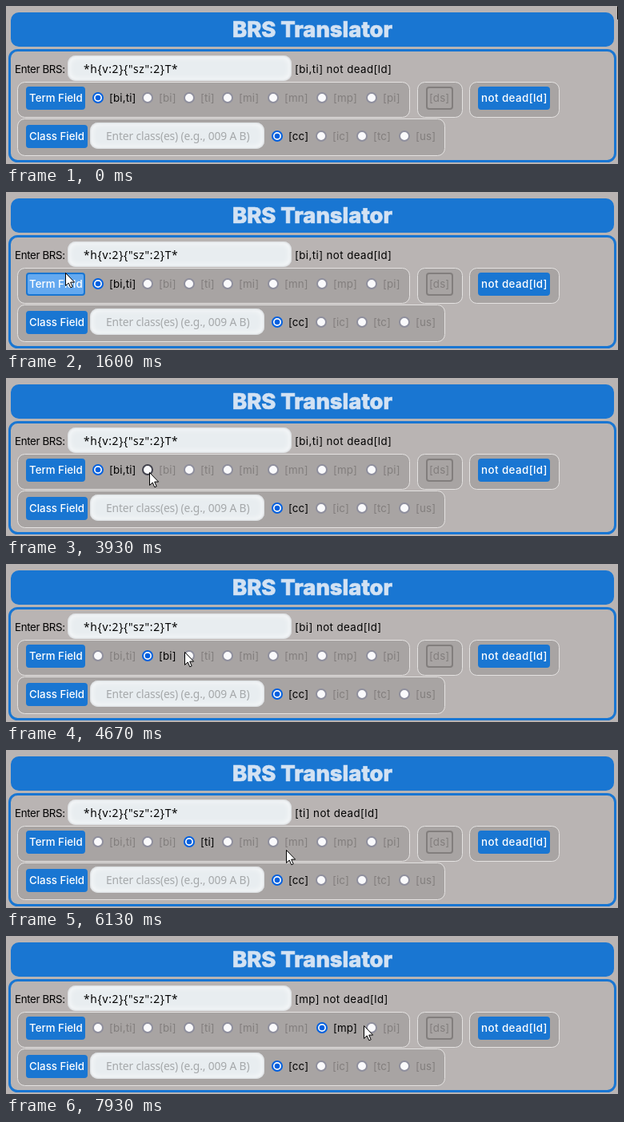
These frames come from a looping animation (765 px wide and 198 px high, 8000 ms). An HTML page:

```html
<!DOCTYPE html>
<html lang="en">
<head>
<meta charset="utf-8">
<title>BRS Translator</title>
<style>
  html, body { margin: 0; width: 100%; height: 100%; overflow: hidden; background: #b9b4b3; }
  svg { display: block; width: 765px; height: 198px; }
  text { font: 13.3px Inter, Roboto, sans-serif; white-space: pre; }
  .title { font-size: 27.4px; font-weight: 800; fill: #d3e2f3; stroke: #d3e2f3; stroke-width: .7; text-anchor: middle; }
  .field { font: 13.8px "Noto Sans", "Open Sans", sans-serif; }
  .button { fill: #fff; font-weight: 500; }
  .label { letter-spacing: .15px; }
  .input {
    height: 100%; border-radius: 10px; background: #e8edf0;
    box-shadow: inset 0 0 3px #b8bcc0, inset 0 0 9px 1px #fff;
  }
</style>
</head>
<body>
<svg id="stage" viewBox="0 0 765 198"></svg>
<script>
const LOOP = 8000, TICKS = 120;
const BLUE = '#1976d2', MUTED = '#827e7d';
const stage = document.getElementById('stage');

function add(tag, attrs, content) {
  const node = document.createElementNS('http://www.w3.org/2000/svg', tag);
  for (const key in attrs) node.setAttribute(key, attrs[key]);
  if (content) node.textContent = content;
  return stage.appendChild(node);
}

const box = (x, y, width, height, rx, attrs) => add('rect', { x, y, width, height, rx, ...attrs });
const write = (x, y, content, attrs) => add('text', { x, y, ...attrs }, content);

function group(x, y, w, h) {
  box(x + .5, y + .5, w - 1, h - 1, 9, { fill: '#a8a4a3', stroke: '#e4e2e1' });
}

function button(x, y, w, caption, spacing = 0) {
  const face = box(x + 1, y + 1, w - 2, 27, 3, { fill: BLUE, stroke: BLUE, 'stroke-width': 2 });
  write(x + 4, y + 19, caption, { class: 'button', 'letter-spacing': spacing });
  return face;
}

function input(x, y, width, height) {
  const face = document.createElement('div');
  face.className = 'input';
  add('foreignObject', { x, y, width, height }).append(face);
}

// state: 0 idle, 1 hovered, 2 pressed
function radio(x, y, name) {
  const ring = add('circle', { cx: x, cy: y, r: 6, fill: '#fafafc', 'stroke-width': 2 });
  const dot = add('circle', { cx: x, cy: y, r: 3.3 });
  const label = write(x + 14, y + 5, name, { class: 'label' });
  const end = x + 14 + label.getComputedTextLength();
  return {
    x, end,
    hit: (px, py) => Math.hypot(px - x, py - y) < 7 ||
      (px >= x + 14 && px <= end && Math.abs(py - y) < 10),
    show(checked, state) {
      const colors = checked ? ['#0060df', '#0250bb', '#054096'] : ['#8f8f9d', '#5b5b66', '#42424d'];
      ring.setAttribute('stroke', colors[state]);
      dot.setAttribute('fill', checked ? colors[state] : 'none');
      label.setAttribute('fill', checked ? '#000' : MUTED);
    }
  };
}

box(6, 8, 754, 43, 10, { fill: BLUE });
write(383, 39, 'BRS Translator', { class: 'title' });
box(4.5, 55.5, 757, 139, 10, { fill: 'none', stroke: BLUE, 'stroke-width': 3 });

write(11, 84, 'Enter BRS:', { 'letter-spacing': -.35 });
input(77, 62, 280, 32);
write(97, 84, '*h{v:2}{"sz":2}T*', { class: 'field', 'letter-spacing': .7 });
const output = write(361, 84, '', { 'letter-spacing': .42 });

group(14, 95, 491, 45);
group(514, 95, 57, 45);
group(579, 95, 113, 45);
group(14, 141, 535, 47);

const termButton = button(25, 101, 74, 'Term Field');
button(590, 101, 90, 'not dead[ld]', .45);
box(526, 102, 32, 27, 3, { fill: 'none', stroke: MUTED, 'stroke-width': 2 });
write(529, 120, '[ds]', { fill: MUTED, class: 'label' });
button(25, 149, 77, 'Class Field');

input(105, 146, 218, 33);
write(125, 168, 'Enter class(es) (e.g., 009 A B)', { class: 'field', fill: '#a5a8aa', 'letter-spacing': -.13 });

const terms = ['[bi,ti]', '[bi]', '[ti]', '[mi]', '[mn]', '[mp]', '[pi]'];
const termX = [115, 177, 229, 277, 334, 395, 457];
const radios = terms.map((name, i) => radio(termX[i], 115, name));
['[cc]', '[ic]', '[tc]', '[us]'].forEach((name, i) =>
  radio([339, 394, 445, 498][i], 163, name).show(i === 0, 0));

const arrow = add('path', {
  d: 'M.5 .5V16.5L4.2 13L6.8 18.8L9.2 17.8L6.7 12.1H11.6Z', fill: '#fff', stroke: '#000'
});
const beam = add('path', {
  d: 'M-3 -7.5H-1L.5 -6.5L2 -7.5H4M.5 -7V7M-3 7.5H-1L.5 6.5L2 7.5H4', fill: 'none', stroke: '#000'
});

// The pointer rests between moves: start tick, end tick, x, y.
const moves = [
  [0, 0, 764, 0],
  [6, 15, 300, 122], [15, 19, 238, 108], [19, 24, 74, 101], [24, 28, 62, 109],
  [35, 38, 166, 113], [39, 42, 205, 112], [44, 46, 189, 102], [46, 51, 179, 123],
  [54, 57, 179, 118], [60, 73, 236, 107], [73, 76, 229, 114], [83, 89, 335, 128],
  [90, 98, 394, 116], [113, 116, 445, 114], [117, 119, 447, 112]
];
const clicks = [61, 83, 104];

function pointerAt(tick) {
  let x, y;
  for (const [from, to, toX, toY] of moves) {
    if (tick < from) break;
    const k = to > from ? Math.min(1, (tick - from) / (to - from)) : 1;
    x = k < 1 ? x + (toX - x) * k : toX;
    y = k < 1 ? y + (toY - y) * k : toY;
  }
  return [Math.round(x), Math.round(y)];
}

const radioAt = (x, y) => radios.findIndex(r => r.hit(x, y));
const overGap = (x, y) => Math.abs(y - 115) < 9 &&
  radios.some((r, i) => i < radios.length - 1 && x > r.end && x < radios[i + 1].x - 10);
const toggle = (node, on) => node.setAttribute('visibility', on ? 'visible' : 'hidden');

function draw(ms) {
  const tick = Math.floor((ms % LOOP) * TICKS / LOOP + .06) % TICKS;
  const [x, y] = pointerAt(tick);

  const lastClick = clicks.filter(t => t <= tick).pop();
  const picked = lastClick ? radioAt(...pointerAt(lastClick)) : 0;
  const pressed = clicks.some(t => tick >= t - 3 && tick < t);
  const hovered = radioAt(x, y);
  radios.forEach((r, i) => r.show(i === picked, i !== hovered ? 0 : pressed ? 2 : 1));
  output.textContent = terms[picked] + ' not dead[ld]';

  const onButton = x >= 25 && x < 99 && y >= 101 && y < 130;
  termButton.setAttribute('fill', onButton ? '#64a9f0' : BLUE);

  const onText = overGap(x, y);
  toggle(arrow, !onText);
  toggle(beam, onText);
  (onText ? beam : arrow).setAttribute('transform', `translate(${x} ${y})`);
}

const start = performance.now();
function frame() {
  draw(performance.now() - start);
  requestAnimationFrame(frame);
}
frame();
</script>
</body>
</html>
```
